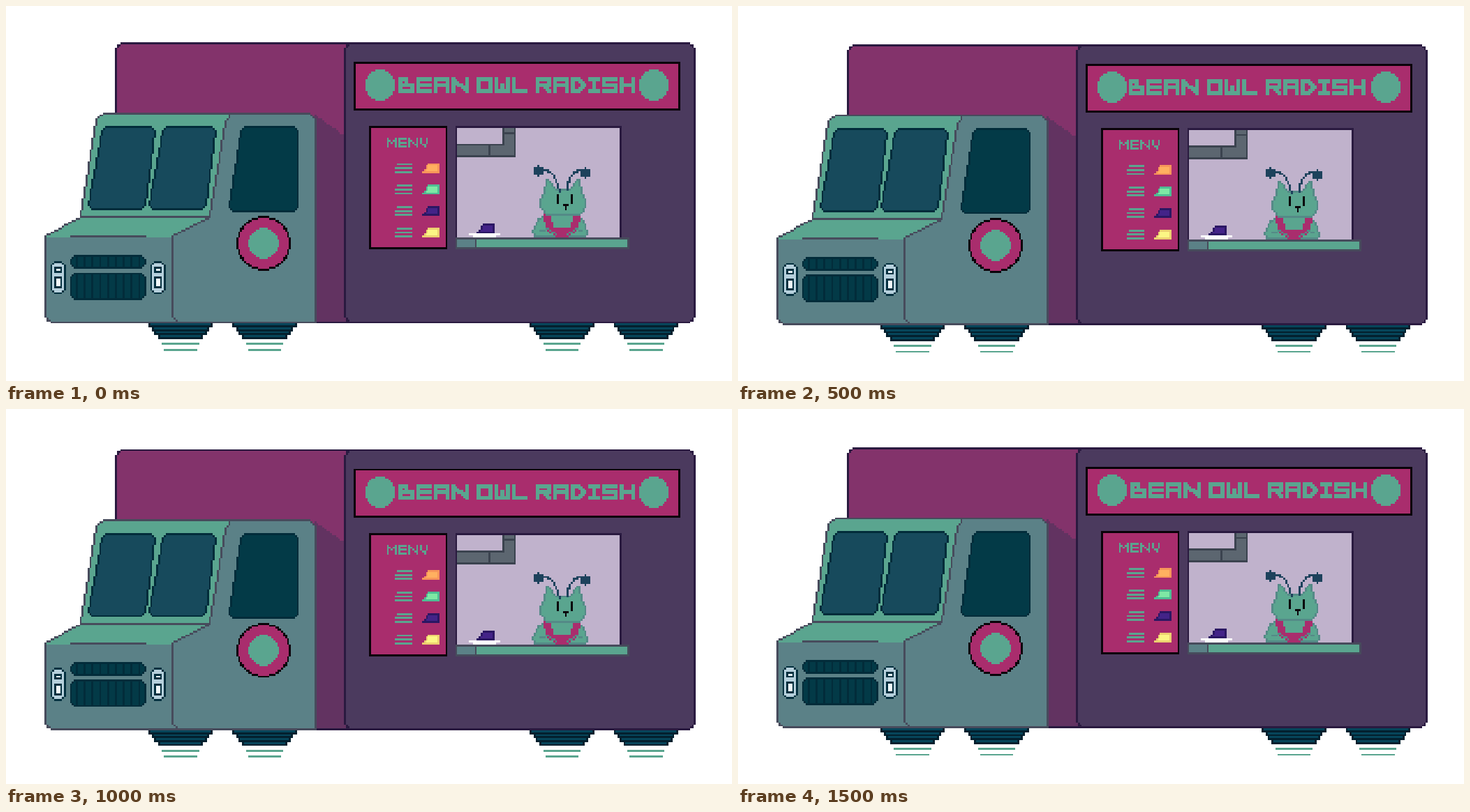
These frames come from a looping animation (1040 px wide and 538 px high, 2 s). An HTML page with a canvas:

```html
<!DOCTYPE html>
<html lang="en">
<head>
<meta charset="utf-8">
<title>Food truck</title>
<style>
  html, body { margin: 0; width: 100%; height: 100%; overflow: hidden; background: #fff; }
  canvas { display: block; }
</style>
</head>
<body>
<canvas id="stage" width="1040" height="538" role="img" aria-label="Food truck: BEAN OWL RADISH, MENU"></canvas>
<script>
// Everything is drawn on a coarse grid whose origin is the truck's top left corner.
const CELL = 2.802, LEFT = 55.2, TOP = 51.9, COLS = 336, ROWS = 164, STEP = 500;

const GREEN = '#5aa58f', STEEL = '#5b8187', EDGE = '#474b5c', INK = '#2a1a40',
      PINK = '#a92d6d', DEEP = '#033a47', RIM = '#022c3a', GLASS = '#174a5c', BLACK = '#0a0309';

const stage = document.getElementById('stage').getContext('2d');
const art = document.createElement('canvas');
art.width = COLS;
art.height = ROWS;
const g = art.getContext('2d');

function rect(x, y, w, h, color) {
  g.fillStyle = color;
  g.fillRect(x, y, w, h);
}

function box(x, y, w, h, fill, stroke) {
  rect(x, y, w, h, stroke);
  rect(x + 1, y + 1, w - 2, h - 2, fill);
}

// Stepped line through a flat list of coordinates, with a square brush.
function line(pts, color, brush = 1) {
  for (let i = 0; i + 3 < pts.length; i += 2) {
    const [x0, y0, x1, y1] = pts.slice(i, i + 4);
    const n = Math.ceil(Math.max(Math.abs(x1 - x0), Math.abs(y1 - y0), 1));
    for (let k = 0; k <= n; k++) {
      rect(Math.round(x0 + (x1 - x0) * k / n), Math.round(y0 + (y1 - y0) * k / n), brush, brush, color);
    }
  }
}

// Polygon filled row by row, so its edges stay hard.
function poly(pts, fill, stroke) {
  const ys = pts.filter((_, i) => i % 2);
  const loop = pts.concat(pts.slice(0, 2));
  for (let y = Math.min(...ys); y <= Math.max(...ys); y++) {
    const hits = [];
    for (let i = 0; i + 3 < loop.length; i += 2) {
      const [x0, y0, x1, y1] = loop.slice(i, i + 4);
      if ((y0 <= y) !== (y1 <= y)) hits.push(x0 + (x1 - x0) * (y - y0) / (y1 - y0));
    }
    hits.sort((a, b) => a - b);
    for (let i = 0; i + 1 < hits.length; i += 2) {
      const x = Math.round(hits[i]);
      rect(x, y, Math.round(hits[i + 1]) - x + 1, 1, fill);
    }
  }
  if (stroke) line(loop, stroke);
}

// Four-sided plate with level top and bottom; each corner is rounded by its cut.
function slab(y0, y1, [tl, tr], [bl, br], [top, bottom], fill, stroke) {
  const corners = [[tl, y0, top], [tr, y0, top], [br, y1, bottom], [bl, y1, bottom]];
  const pts = corners.flatMap(([x, y, cut], i) => {
    const toward = j => {
      const [px, py] = corners[(i + j) % 4];
      const f = cut / Math.hypot(px - x, py - y);
      return [x + (px - x) * f, y + (py - y) * f];
    };
    const a = toward(3), b = toward(1);
    const mid = [0, 1].map(k => (a[k] + b[k]) / 4 + (k ? y : x) / 2);
    return cut > 2 ? [...a, ...mid, ...b] : [...a, ...b];
  });
  poly(pts.map(Math.round), fill, stroke);
}

function panel(x, y, w, h, cut, fill, stroke) {
  const span = [x, x + w - 1];
  slab(y, y + h - 1, span, span, [cut, cut], fill, stroke);
}

// Completes a left half by reflecting it; axis is the sum of two matching columns.
function mirror(half, axis) {
  const pts = half.slice();
  for (let i = half.length - 2; i >= 0; i -= 2) pts.push(axis - half[i], half[i + 1]);
  return pts;
}

function curve(x0, y0, cx, cy, x1, y1, color) {
  const pts = [];
  for (let t = 0; t <= 1; t += 0.125) {
    const a = (1 - t) ** 2, b = 2 * t * (1 - t), c = t * t;
    pts.push(a * x0 + b * cx + c * x1, a * y0 + b * cy + c * y1);
  }
  line(pts, color);
}

function disc(cx, cy, r, color) {
  for (let y = Math.ceil(cy - r); y <= cy + r; y++) {
    const half = Math.sqrt(r * r - (y - cy) ** 2);
    const x = Math.ceil(cx - half);
    rect(x, y, Math.floor(cx + half) - x + 1, 1, color);
  }
}

// Letter strokes over a 3 by 3 keypad, 1 top left to 9 bottom right.
const GLYPHS = {
  A: '7139 46', B: '217964 25', D: '126871', E: '3179 46', H: '17 39 46', I: '13 28 79',
  L: '179', M: '71539', N: '7193', O: '13971', R: '71364 59', S: '314697', U: '14863', W: '1793 58'
};

function word(text, x, y, w, h, brush, color) {
  for (const ch of text) {
    if (ch === ' ') { x += 3; continue; }
    const wide = w + ('MN'.includes(ch) ? 1 : ch === 'I' ? -2 : 0);
    for (const stroke of GLYPHS[ch].split(' ')) {
      const pts = [...stroke].flatMap(d => [
        x + (d - 1) % 3 / 2 * (wide - brush),
        y + Math.floor((d - 1) / 3) / 2 * (h - brush)
      ]);
      line(pts, color, brush);
    }
    x += wide + 1;
  }
}

function wedge(x, y, edge, core) {
  poly([x + 3, y, x + 8, y, x + 8, y + 4, x, y + 4], core, edge);
}

function wheel(x) {
  for (let i = 0; i < 4; i++) {
    const inset = Math.round(i * 1.6), y = 144 + i * 2;
    rect(x + inset, y, 33 - inset * 2, 2, '#03202e');
    rect(x + inset + 1, y, 31 - inset * 2, 1, '#06455a');
  }
  rect(x + 7, 154, 19, 1, GREEN);
  rect(x + 8, 157, 17, 1, GREEN);
}

function grill(y, h) {
  panel(13, y, 39, h, 2, DEEP, RIM);
  for (let x = 16; x < 50; x += 4) rect(x, y + 1, 1, h - 2, RIM);
}

function headlight(x) {
  panel(x, 112, 8, 17, 2, '#b6d0dc', '#04303f');
  box(x + 2, 115, 4, 3, '#e8f4f8', '#04303f');
  box(x + 2, 120, 4, 6, '#f2fafc', '#04303f');
}

function trailer() {
  panel(36, 0, 130, 144, 4, '#83336b', INK);
  poly([138, 37, 153, 48, 153, 143, 138, 143], '#623361');
  panel(153, 0, 180, 144, 4, '#4b3a5e', INK);
}

function cab() {
  slab(99, 143, [0, 74], [0, 74], [0, 4], STEEL, EDGE);
  slab(36, 89, [27, 98], [18, 84], [3, 0], GREEN, EDGE);
  poly([18, 90, 84, 90, 65, 99, 65, 100, 0, 100, 0, 99], GREEN);
  line([18, 89, 0, 99], EDGE);
  poly([95, 36, 135, 36, 138, 39, 138, 143, 68, 143, 65, 140, 65, 99, 84, 89, 92, 40], STEEL, EDGE);
  rect(13, 99, 39, 1, EDGE);

  for (const x of [0, 31]) slab(43, 85, [x + 29, x + 56], [x + 22, x + 51], [2, 2], GLASS, RIM);
  slab(43, 86, [100, 129], [94, 129], [2, 2], DEEP, RIM);

  grill(109, 7);
  grill(118, 14);
  headlight(3);
  headlight(54);

  disc(111.5, 102.5, 13.9, BLACK);
  disc(111.5, 102.5, 12.9, PINK);
  disc(111.5, 102.5, 7.7, GREEN);
}

function sign(shift) {
  box(158, 10, 167, 25, PINK, BLACK);
  disc(171, 21.5, 7.8, GREEN);
  disc(311, 21.5, 7.8, GREEN);
  word('BEAN OWL RADISH', 181 + shift, 18, 8, 8, 2, GREEN);
}

function menu() {
  box(166, 43, 40, 63, PINK, BLACK);
  word('MENU', 175, 49, 4, 5, 1, GREEN);
  const items = [['#f7955a', '#ffb060'], ['#4fbd94', '#7ee8a4'], ['#2b1763', '#432388'], ['#ecd070', '#fbf684']];
  items.forEach(([edge, core], i) => {
    const y = 62 + i * 11;
    for (let k = 0; k < 3; k++) {
      const indent = k ? 0 : 1;
      rect(179 + indent, y + k * 2, 9 - indent, 1, GREEN);
    }
    wedge(193, y, edge, core);
  });
}

function pipe() {
  const metal = '#5c6670', seam = '#3b434f';
  rect(211, 52, 30, 7, metal);
  rect(234, 44, 7, 9, metal);
  line([211, 52, 234, 52, 234, 44], seam);
  line([240, 44, 240, 58, 211, 58], seam);
  rect(227, 52, 1, 7, seam);
  rect(234, 46, 7, 1, seam);
}

function cook() {
  const shade = '#548a87', feeler = '#1d425c';
  poly(mirror([257, 88, 252, 90, 250, 94, 249, 97, 250, 99], 526), GREEN, shade);
  poly(mirror([259, 95, 258, 88, 255, 88, 256, 95, 262, 100], 528), PINK);
  line([253, 96, 257, 95, 261, 98], shade);
  line([274, 96, 271, 95, 267, 98], shade);
  poly(mirror([261, 75, 257, 70, 256, 70, 255, 77, 253, 80, 253, 84, 256, 88], 529), GREEN, shade);

  for (const x of [262, 269]) rect(x, 78, 1, 5, BLACK);
  rect(265, 83, 3, 1, BLACK);
  rect(266, 84, 1, 2, BLACK);

  disc(252, 65.5, 2.6, feeler);
  disc(276, 66.5, 2.6, feeler);
  curve(254, 65, 260, 64, 263, 76, feeler);
  curve(275, 65, 267, 65, 267, 75, feeler);
}

function hatch() {
  box(210, 43, 85, 58, '#c0b2cc', INK);
  pipe();
  cook();
  wedge(221, 93, '#2b1763', '#432388');
  rect(217, 98, 16, 1, '#fff');
  rect(219, 99, 12, 1, '#fff');
  box(210, 100, 89, 6, GREEN, EDGE);
  rect(211, 101, 9, 4, STEEL);
  rect(220, 101, 1, 4, EDGE);
}

function draw(now) {
  const beat = Math.floor(now / STEP) % 4;
  const bob = 2 - Math.abs(2 - beat);
  g.clearRect(0, 0, COLS, ROWS);
  [53, 96, 248, 291].forEach(wheel);
  trailer();
  cab();
  sign(beat === 1 ? -1 : 0);
  menu();
  hatch();
  stage.fillStyle = '#fff';
  stage.fillRect(0, 0, 1040, 538);
  stage.imageSmoothingEnabled = false;
  stage.drawImage(art, LEFT, TOP + bob * CELL, COLS * CELL, ROWS * CELL);
}

const start = performance.now();
function tick() {
  draw(performance.now() - start);
  requestAnimationFrame(tick);
}
tick();
</script>
</body>
</html>
```
